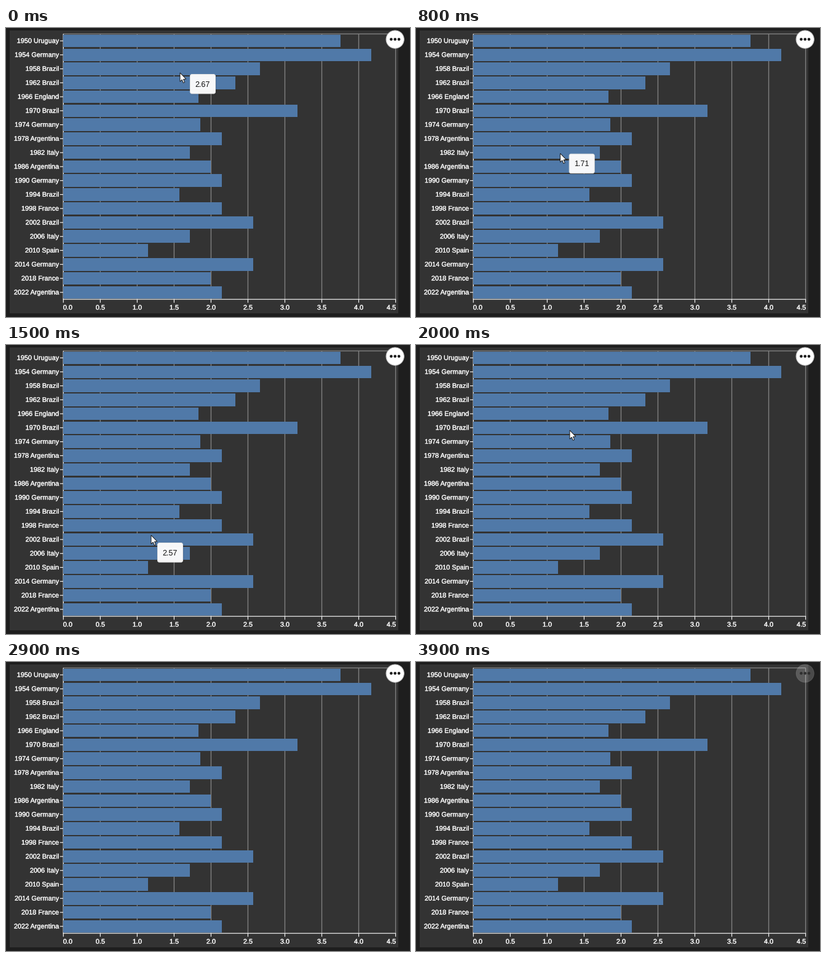
Recreate the animation shown at these times as a matplotlib script. Size 657 by 471 pixels, loop 4000 ms.

```python
import numpy as np
import matplotlib.pyplot as plt
from matplotlib.animation import FuncAnimation
from matplotlib.patches import Circle, FancyBboxPatch, Polygon, Rectangle
from matplotlib.patheffects import withStroke
from matplotlib.transforms import Affine2D

W, H, DPI = 657, 471, 100
FRAMES, INTERVAL = 40, 100
PX = 72 / DPI  # points per pixel

plt.rcParams["font.family"] = "Liberation Sans"
plt.rcParams["text.hinting"] = "none"
plt.rcParams["toolbar"] = "None"

# goals per match
DATA = [
    ("1950 Uruguay", 3.75), ("1954 Germany", 25 / 6), ("1958 Brazil", 8 / 3),
    ("1962 Brazil", 7 / 3), ("1966 England", 11 / 6), ("1970 Brazil", 19 / 6),
    ("1974 Germany", 13 / 7), ("1978 Argentina", 15 / 7), ("1982 Italy", 12 / 7),
    ("1986 Argentina", 2), ("1990 Germany", 15 / 7), ("1994 Brazil", 11 / 7),
    ("1998 France", 15 / 7), ("2002 Brazil", 18 / 7), ("2006 Italy", 12 / 7),
    ("2010 Spain", 8 / 7), ("2014 Germany", 18 / 7), ("2018 France", 2),
    ("2022 Argentina", 15 / 7),
]
LEFT, RIGHT, TOP, BOTTOM = 93.3, 633.6, 9.6, 442.2
UNIT = (RIGHT - LEFT) / 4.5
STEP = (BOTTOM - TOP) / len(DATA)
BAR_H = 0.9 * STEP

PANEL, BAR, GRID, INK = "#333333", "#5079a8", "#808080", "#f4f4f4"

# time in ms, pointer x and y, then the slightly late hover point x and y
PATH = np.array([
    (0, 283, 73, 289, 65),
    (500, 251, 167, 259, 150),
    (1100, 226, 241, 226, 240.5),
    (1500, 236, 310, 236, 312),
    (1800, 243, 216, 243, 222),
    (2000, 250, 139, 249, 146.2),
    (2400, 334, 34, 328, 38),
    (2700, 470, 12, 462, 14),
    (2900, 586, -17, 578, -14),
], float)
TIMES, POINTS = PATH[:, 0], PATH[:, 1:]
SPEEDS = np.gradient(POINTS, TIMES, axis=0)

fig = plt.figure(figsize=(W / DPI, H / DPI), dpi=DPI, facecolor="#1e1e1e")
ax = fig.add_axes([0, 0, 1, 1])
ax.set_xlim(0, W)
ax.set_ylim(H, 0)
ax.axis("off")


def rect(x, y, w, h, color, z):
    ax.add_patch(Rectangle((x, y), w, h, fc=color, lw=0, zorder=z))


def line(x0, y0, x1, y1, color, z, width=1.4):
    ax.plot([x0, x1], [y0, y1], color=color, lw=width * PX, zorder=z,
            solid_capstyle="butt", snap=False)


def label(x, y, text, ha):
    ax.text(x, y + 4, text, color=INK, size=10.9 * PX, ha=ha, va="baseline",
            zorder=4, path_effects=[withStroke(linewidth=0.3 * PX, foreground=INK)])


def draw_chart():
    rect(6, 4, 632, 461, PANEL, 0)
    line(LEFT, TOP, RIGHT, TOP, GRID, 1)
    for i in range(10):
        x = LEFT + i * UNIT / 2
        line(x, TOP, x, BOTTOM, GRID, 1)
        line(x, BOTTOM, x, BOTTOM + 5.5, INK, 2, 1.2)
        if i == 0:
            label(x - 0.5, 455, "0.0", "left")
        elif i == 9:
            label(x + 0.5, 455, "4.5", "right")
        else:
            label(x, 455, f"{i / 2:.1f}", "center")
    line(LEFT, TOP, LEFT, BOTTOM, INK, 2, 1.2)
    line(LEFT - 0.6, BOTTOM, RIGHT + 0.6, BOTTOM, INK, 4, 1.2)
    for i, (name, value) in enumerate(DATA):
        mid = TOP + (i + 0.5) * STEP
        rect(LEFT, mid - BAR_H / 2, value * UNIT, BAR_H, BAR, 3)
        line(LEFT - 5.5, mid, LEFT, mid, INK, 2, 1.2)
        label(86, mid - 0.6, name, "right")


def rounded(x, y, w, h, r, z, **style):
    box = FancyBboxPatch((x, y), w, h, zorder=z,
                         boxstyle=f"round,pad=0,rounding_size={r}", **style)
    return ax.add_patch(box)


def make_tooltip():
    parts = [rounded(2 - g, 2 - g, 41 + 2 * g, 32 + 2 * g, 3 + g, 6,
                     fc=(0, 0, 0, 0.035), lw=0) for g in (-1, 0, 1)]
    parts.append(rounded(0.5, 0.5, 41, 31.5, 3, 7, fc=(1, 1, 1, 0.96),
                         ec="#e0e0e0", lw=PX))
    text = ax.text(21, 20.6, "", color="#111111", size=12.5 * PX,
                   ha="center", va="baseline", zorder=8)
    return parts + [text], text


def make_pointer():
    shape = np.array([(0, 0), (0, 14.2), (3.2, 11.3), (5.3, 16.4),
                      (7.6, 15.4), (5.5, 10.5), (9.8, 10.2)])
    return ax.add_patch(Polygon(shape, fc="white", ec="#111111", lw=0.9 * PX,
                                joinstyle="miter", zorder=11))


def make_button():
    disc = ax.add_patch(Circle((632.7, 18.6), 14.6, fc="white", ec="#bbbbbb",
                               lw=PX, zorder=9))
    dots = [ax.add_patch(Circle((632.7 + dx, 18.4), 2.3, lw=0, zorder=10))
            for dx in (-6.3, 0, 6.3)]
    return disc, dots


def position(t):
    """Cubic Hermite point on the path."""
    k = min(np.searchsorted(TIMES, t, side="right") - 1, len(TIMES) - 2)
    span = TIMES[k + 1] - TIMES[k]
    s = (t - TIMES[k]) / span
    return ((1 + 2 * s) * (1 - s) ** 2 * POINTS[k]
            + s * (1 - s) ** 2 * span * SPEEDS[k]
            + s * s * (3 - 2 * s) * POINTS[k + 1]
            + s * s * (s - 1) * span * SPEEDS[k + 1])


def value_at(x, y):
    """Value of the bar under a point, or None."""
    row = int(np.floor((y - TOP) / STEP))
    if not 0 <= row < len(DATA):
        return None
    value = DATA[row][1]
    inside = abs(y - TOP - (row + 0.5) * STEP) <= BAR_H / 2
    return value if inside and LEFT <= x <= LEFT + value * UNIT else None


draw_chart()
tooltip, tip_text = make_tooltip()
pointer = make_pointer()
disc, dots = make_button()


def place(artist, x, y):
    artist.set_transform(Affine2D().translate(x, y) + ax.transData)


def update(frame):
    t = frame * INTERVAL
    moving = t <= TIMES[-1]
    value = None
    if moving:
        px, py, hx, hy = position(t)
        place(pointer, px, py)
        value = value_at(hx, hy)
    pointer.set_visible(moving)
    for part in tooltip:
        part.set_visible(value is not None)
        if value is not None:
            place(part, hx + 10, hy + 10)
    if value is not None:
        tip_text.set_text(f"{value:.2f}")

    fade = np.clip((t - 2950) / 400, 0, 1) ** 1.7
    alpha = 1 - 0.8 * fade
    disc.set_alpha(alpha)
    shade = (27 * alpha + 51 * (1 - alpha)) / 255
    for dot in dots:
        dot.set_facecolor((shade, shade, shade))
    return [pointer, disc, *dots, *tooltip]


anim = FuncAnimation(fig, update, frames=FRAMES, interval=INTERVAL,
                     repeat=True, repeat_delay=0, blit=False)
plt.show()
```
